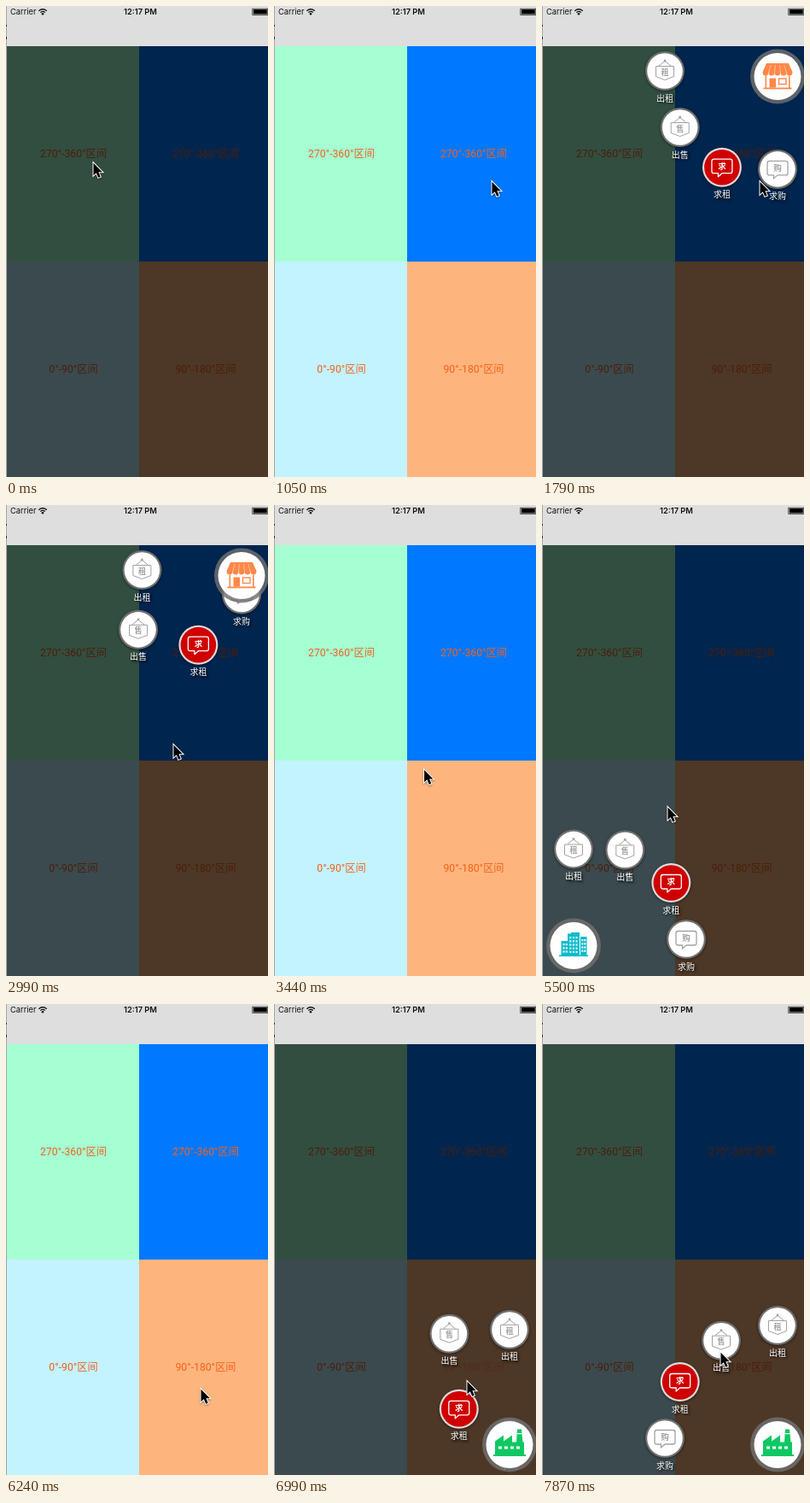
These frames come from a looping animation (307x551 px, 8 s). An HTML page with a canvas:

```html
<!DOCTYPE html>
<html lang="zh">
<head>
<meta charset="utf-8">
<title>Corner menus</title>
<style>
html, body { margin: 0; width: 100%; height: 100%; overflow: hidden; background: #dedede; }
canvas { display: block; width: 307px; height: 551px; }
</style>
</head>
<body>
<canvas id="stage" width="307" height="551"></canvas>
<script>
const ctx = document.getElementById('stage').getContext('2d');
const LOOP = 8000;
const CJK = "'Noto Sans CJK SC', 'Noto Sans CJK', sans-serif";
const FAR = 148, NEAR = 101, END = 132;
const TRAVEL = 500, STAGGER = 82, CLOSE_ALL = TRAVEL + 3 * STAGGER;

const panels = [
  { x: 1, y: 47, w: 155, color: '#a5ffd2', text: '270°-360°区间', tx: 79 },
  { x: 156, y: 47, w: 151, color: '#0078ff', text: '270°-360°区间', tx: 234 },
  { x: 1, y: 299, w: 155, color: '#c3f3ff', text: '0°-90°区间', tx: 79 },
  { x: 156, y: 299, w: 151, color: '#feb57d', text: '90°-180°区间', tx: 234 }
];

const items = [
  { label: '出租', glyph: '租', icon: sign },
  { label: '出售', glyph: '售', icon: sign },
  { label: '求租', glyph: '求', icon: bubble, hot: true },
  { label: '求购', glyph: '购', icon: bubble }
];

// from: angle of the first item, turn: sign of the fan, panel: pressed button
const menus = [
  { x: 276, y: 76, hubY: 82.5, from: 180, turn: 1, panel: 1, open: 1137, shut: 2523, icon: shop },
  { x: 37, y: 508, hubY: 515.5, from: 90, turn: -1, panel: 2, open: 3960, shut: 5358, icon: towers },
  { x: 276, y: 508, hubY: 515.5, from: 90, turn: 1, panel: 3, open: 6750, shut: 7340 + LOOP, icon: factory }
];

const pointer = [
  [0, 102, 183], [150, 102, 183], [600, 255, 205], [1800, 255, 205],
  [2480, 196, 280], [3250, 196, 280], [3900, 98, 420], [4250, 98, 420],
  [5050, 147, 353], [5520, 147, 353], [6200, 228, 450], [6260, 228, 450],
  [6700, 226, 441], [7000, 226, 441], [7720, 215, 415], [7870, 209, 407], [8000, 209, 407]
];

const clamp = v => Math.max(0, Math.min(1, v));
const mix = (a, b, k) => a + (b - a) * k;

function fillRect(color, x, y, w, h) {
  ctx.fillStyle = color;
  ctx.fillRect(x, y, w, h);
}

function disc(color, x, y, r) {
  ctx.fillStyle = color;
  ctx.beginPath();
  ctx.arc(x, y, r, 0, Math.PI * 2);
  ctx.fill();
}

function poly(...pts) {
  ctx.beginPath();
  for (let i = 0; i < pts.length; i += 2) ctx.lineTo(pts[i], pts[i + 1]);
  ctx.closePath();
}

function write(text, x, y, font, color, align = 'center') {
  ctx.font = font;
  ctx.fillStyle = color;
  ctx.textAlign = align;
  ctx.fillText(text, x, y);
}

function at(x, y, draw) {
  ctx.save();
  ctx.translate(x, y);
  draw();
  ctx.restore();
}

function sign(glyph, ink) {
  ctx.strokeStyle = ink;
  ctx.lineWidth = 1;
  ctx.lineJoin = 'round';
  poly(-10.5, -5.5, 10.5, -5.5, 10.5, 6.5, 0, 10.5, -10.5, 6.5);
  ctx.stroke();
  ctx.beginPath();
  ctx.moveTo(-7, -6);
  ctx.lineTo(0, -11.5);
  ctx.lineTo(7, -6);
  ctx.stroke();
  disc(ink, 0, -12, 1.4);
  write(glyph, 0, 4.6, 'bold 9px ' + CJK, ink);
}

function bubble(glyph, ink) {
  ctx.strokeStyle = ink;
  ctx.lineWidth = 1.3;
  ctx.lineJoin = 'round';
  ctx.beginPath();
  ctx.moveTo(-9.5, -9.5);
  ctx.arcTo(12, -9.5, 12, 7, 2.5);
  ctx.arcTo(12, 7, 0, 7, 2.5);
  ctx.lineTo(0, 7);
  ctx.lineTo(-4.5, 11);
  ctx.lineTo(-4.5, 7);
  ctx.arcTo(-12, 7, -12, -9, 2.5);
  ctx.arcTo(-12, -9.5, -9, -9.5, 2.5);
  ctx.closePath();
  ctx.stroke();
  write(glyph, 0, 2.4, 'bold 9.5px ' + CJK, ink);
}

function shop() {
  const c = '#ff8748';
  ctx.fillStyle = c;
  poly(-13, -15.5, 13, -15.5, 17.5, -5, -17.5, -5);
  ctx.fill();
  for (let i = 0; i < 5; i++) disc(c, -14 + i * 7, -4.5, 3.4);
  ctx.strokeStyle = '#ffc9a8';
  ctx.lineWidth = 0.8;
  for (let i = -1.5; i < 2; i++) {
    ctx.beginPath();
    ctx.moveTo(i * 5.2, -13.5);
    ctx.lineTo(i * 7, -4);
    ctx.stroke();
  }
  fillRect(c, -14.5, -1, 1.6, 15);
  fillRect(c, 13, -1, 1.6, 15);
  fillRect(c, -16.5, 13, 33, 1.8);
  fillRect(c, -9.5, 2, 7.5, 11);
  ctx.strokeStyle = c;
  ctx.lineWidth = 1.4;
  ctx.strokeRect(1.5, 2.5, 8.5, 6.5);
}

function windows(x, y, cols, rows, dx, dy) {
  for (let i = 0; i < cols * rows; i++)
    fillRect('#fff', x + (i % cols) * dx, y + Math.floor(i / cols) * dy, 2, 2.2);
}

function towers() {
  const c = '#0bbccb';
  fillRect(c, -14.5, -5.5, 8.5, 17);
  fillRect(c, -7, -14, 14, 26);
  fillRect(c, -3, -15.5, 10, 3);
  fillRect(c, 8, -10.5, 7.5, 22);
  fillRect(c, -17, 11, 34, 1.6);
  windows(-12.5, -2.5, 2, 3, 3.3, 4.2);
  windows(-4.7, -10.5, 3, 5, 3.6, 4.2);
  windows(9.3, -7.5, 2, 4, 3, 4.2);
}

function factory() {
  const c = '#0fc864';
  ctx.fillStyle = c;
  poly(-17, 12, -17, -4, -7, -11, -7, -4, 3, -11, 3, -3, 8, -3, 9, -18, 14, -18, 15.5, -3, 17, -3, 17, 12);
  ctx.fill();
  fillRect(c, -19, 11.5, 38, 2);
  for (let i = 0; i < 4; i++) fillRect('#fff', -13 + i * 7, 2, 4, 3);
  fillRect('#fff', 8.5, -13.5, 6, 1.2);
}

function radius(p) {
  const k = clamp(p) * 3;
  if (k < 1) return FAR * k;
  if (k < 2) return mix(FAR, NEAR, k - 1);
  return mix(NEAR, END, k - 2);
}

function drawItem(item, x, y) {
  at(x, y, () => {
    ctx.save();
    ctx.shadowColor = 'rgba(0,0,0,.5)';
    ctx.shadowBlur = 3;
    ctx.shadowOffsetY = 1;
    disc(item.hot ? '#dcdcdc' : '#707070', 0, 0, 23);
    ctx.restore();
    disc(item.hot ? '#d00000' : '#fff', 0, 0, 20.8);
    item.icon(item.glyph, item.hot ? '#fff' : '#a2a2a2');
    ctx.shadowColor = '#000';
    ctx.shadowBlur = 3;
    ctx.shadowOffsetX = ctx.shadowOffsetY = 1.5;
    write(item.label, 0, 35.5, '10px ' + CJK, '#fff');
  });
}

function drawMenu(menu, t) {
  items.forEach((item, i) => {
    const rank = menu.turn > 0 ? i : 3 - i;
    const p = t < menu.shut
      ? (t - menu.open - rank * STAGGER) / TRAVEL
      : 1 - (t - menu.shut - (3 - rank) * STAGGER) / TRAVEL;
    const a = (menu.from + menu.turn * i * 30) * Math.PI / 180;
    const r = radius(p);
    drawItem(item, menu.x + Math.cos(a) * r, menu.y - Math.sin(a) * r);
  });
  at(menu.x, menu.hubY, () => {
    disc('rgba(112,112,112,.82)', 0, 0, 32);
    disc('#fff', 0, 0, 27.5);
    menu.icon();
  });
}

function drawBar() {
  fillRect('#dedede', 0, 0, 307, 47);
  fillRect('#a6a6a6', 0, 0, 1, 551);
  fillRect('#333', 0, 22, 1, 2);
  fillRect('#333', 0, 36, 1, 3);
  write('Carrier', 5, 10.3, '9.3px Inter, sans-serif', '#111', 'left');
  write('12:17 PM', 157.5, 10.3, '600 9.3px Inter, sans-serif', '#111');
  ctx.strokeStyle = '#111';
  ctx.lineWidth = 1.4;
  for (const r of [3.6, 6.2]) {
    ctx.beginPath();
    ctx.arc(43, 10, r, -Math.PI * 0.77, -Math.PI * 0.23);
    ctx.stroke();
  }
  disc('#111', 43, 9.2, 1.3);
  ctx.lineWidth = 0.7;
  ctx.strokeRect(288.8, 3.2, 18, 7.2);
  fillRect('#000', 289.8, 4.1, 16, 5.4);
}

function drawPanels(t) {
  panels.forEach((p, i) => {
    fillRect(p.color, p.x, p.y, p.w, 252);
    const menu = menus.find(m => m.panel === i);
    const since = menu ? t - menu.open : -LOOP;
    ctx.globalAlpha = since > -80 ? mix(0.2, 1, clamp((since - 150) / 400)) : 1;
    write(p.text, p.tx, p.y + 130.3, '12.2px Roboto, ' + CJK, '#f4601c');
    ctx.globalAlpha = 1;
  });
}

function drawPointer(t) {
  const i = pointer.findIndex((p, k) => k > 0 && t <= p[0]);
  const [t0, x0, y0] = pointer[i - 1], [t1, x1, y1] = pointer[i];
  const k = (t - t0) / (t1 - t0), e = k * k * (3 - 2 * k);
  at(mix(x0, x1, e), mix(y0, y1, e), () => {
    poly(0.5, 0.8, 0.5, 15.2, 3.8, 12.2, 6.2, 17.8, 8.7, 16.7, 6.4, 11.3, 10.9, 11.3);
    ctx.shadowColor = 'rgba(0,0,0,.4)';
    ctx.shadowBlur = 2;
    ctx.shadowOffsetY = 1;
    ctx.strokeStyle = '#fff';
    ctx.lineWidth = 2;
    ctx.lineJoin = 'miter';
    ctx.stroke();
    ctx.shadowColor = 'transparent';
    ctx.fillStyle = '#000';
    ctx.fill();
  });
}

function frame(now) {
  const t = now % LOOP;
  const dimTail = 80;
  drawBar();
  drawPanels(t);
  const shade = t < 100 || menus.some(m => t >= m.open && t < m.shut + CLOSE_ALL + dimTail);
  if (shade) fillRect('rgba(0,0,0,.695)', 1, 47, 306, 504);
  const menu = menus.find(m => t >= m.open && t < m.shut + CLOSE_ALL);
  if (menu) drawMenu(menu, t);
  drawPointer(t);
}

const start = performance.now();
function tick() {
  frame(performance.now() - start);
  requestAnimationFrame(tick);
}
tick();
</script>
</body>
</html>
```
